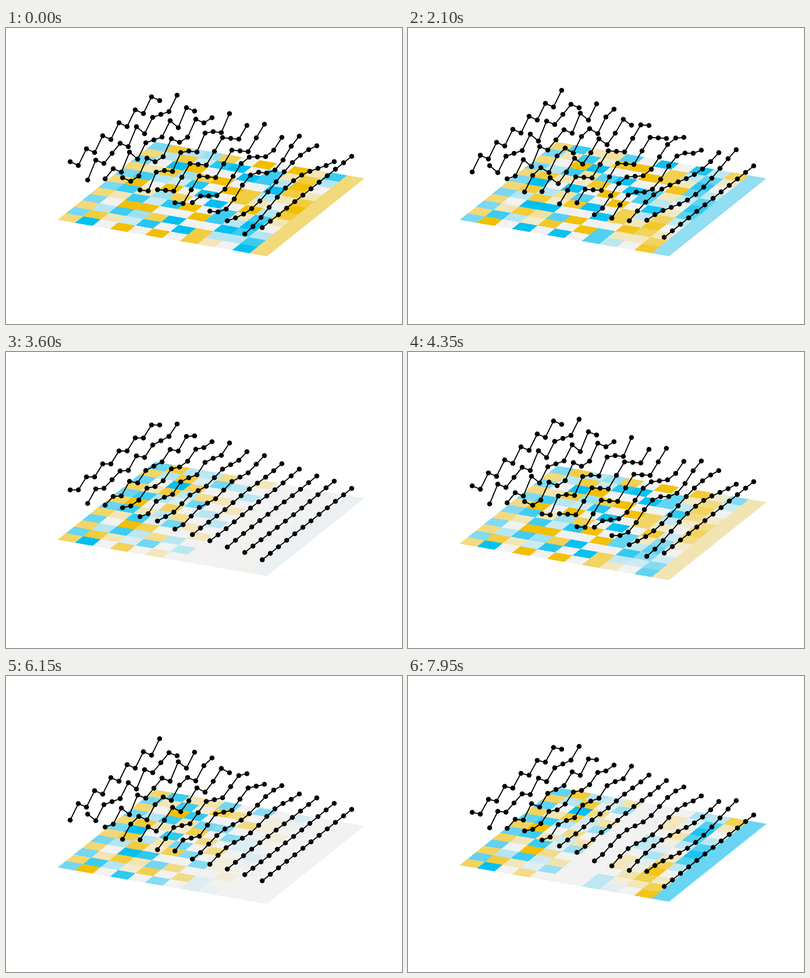
An HTML page that plays this animation: 802 by 602 pixels, repeating every 8 s.

```html
<!DOCTYPE html>
<html lang="en">
<head>
<meta charset="utf-8">
<title>Normal modes of a ring</title>
<style>
  html, body { margin: 0; width: 100%; height: 100%; overflow: hidden; background: #fff; }
  svg { display: block; width: 100vw; height: 100vh; }
</style>
</head>
<body>
<svg id="stage" viewBox="0 0 802 602">
  <g id="floor" shape-rendering="crispEdges"></g>
  <g id="chains" fill="none" stroke="#000" stroke-width="2.2" stroke-linejoin="round"></g>
  <g id="dots" fill="#000"></g>
</svg>
<script>
const N = 12, LOOP = 8000, STEP = 150;
const PI = Math.PI, AMP = 14.7, TWIST = 0.11;
const BASE_FREQ = 2 * PI / 33, COUPLING = 0.4;

// Pixel vectors of the oblique view
const COL = { x: 35.33, y: 6.17 }, ROW = { x: 16.45, y: -13.2 };
const DROP = 6.02;            // each chain hangs this much lower than the one before
const LEFT = 104.6, FIRST_X = 130;

// Wave number and phase of the mode on each chain
const modes = [
  [6, PI], [5, 0], [5, -PI / 2], [4, PI + TWIST], [4, PI / 2 + TWIST], [3, PI],
  [3, PI / 2], [2, 7 * PI / 6], [2, 2 * PI / 3], [1, PI / 2], [1, 0], [0, PI]
].map(([k, phase]) => ({
  freq: BASE_FREQ * Math.sqrt(1 + COUPLING * Math.sin(PI * k / N) ** 2),
  shape: Array.from({ length: N }, (_, i) =>
    AMP * (k % 6 ? 1 : Math.SQRT1_2) * Math.cos(2 * PI * k * i / N - phase))
}));

const add = (parent, tag) =>
  document.getElementById(parent).appendChild(document.createElementNS("http://www.w3.org/2000/svg", tag));

const chains = modes.map(() => add("chains", "polyline"));
const grid = tag => modes.map(m => m.shape.map(() => add(tag === "circle" ? "dots" : "floor", tag)));
const cells = grid("polygon"), dots = grid("circle");
dots.flat().forEach(d => d.setAttribute("r", 5));

// Blue below rest, gold above, strength by squared displacement
function color(ratio) {
  const s = Math.min(1, ratio * ratio);
  const fade = Math.round(242 * (1 - s)), mid = Math.round(242 - 51 * s);
  return ratio > 0 ? `rgb(${fade},${mid},242)` : `rgb(242,${mid},${fade})`;
}

function draw(ms) {
  const n = Math.floor((ms % LOOP) / STEP);
  const shift = modes.map(m => m.shape.map(v => v * Math.cos(m.freq * n)));
  const peak = Math.max(...shift.flat().map(Math.abs));
  const top = Math.max(...shift.flatMap((c, j) => c.map(v => -v - DROP * j)));

  // The scene stays centred between its highest dot and the floor
  const depth = 75.4 + 2.2 * peak;
  const rest = (662.2 + top - depth) / 2;
  const floorY = rest + depth;
  const corner = (j, i) =>
    `${(LEFT + j * COL.x + i * ROW.x).toFixed(2)},${(floorY + j * COL.y + i * ROW.y).toFixed(2)}`;

  shift.forEach((chain, j) => {
    const points = chain.map((v, i) => {
      const x = (FIRST_X + j * 35.36 + i * 16.47).toFixed(2);
      const y = (rest + j * (COL.y + DROP) + i * ROW.y + v).toFixed(2);
      dots[j][i].setAttribute("cx", x);
      dots[j][i].setAttribute("cy", y);
      const cell = cells[j][i];
      cell.setAttribute("points",
        [corner(j, i), corner(j + 1, i), corner(j + 1, i + 1), corner(j, i + 1)].join(" "));
      cell.setAttribute("fill", color(v / peak));
      return `${x},${y}`;
    });
    chains[j].setAttribute("points", points.join(" "));
  });
}

const start = performance.now();
function tick() {
  draw(performance.now() - start);
  requestAnimationFrame(tick);
}
draw(0);
requestAnimationFrame(tick);
</script>
</body>
</html>
```
